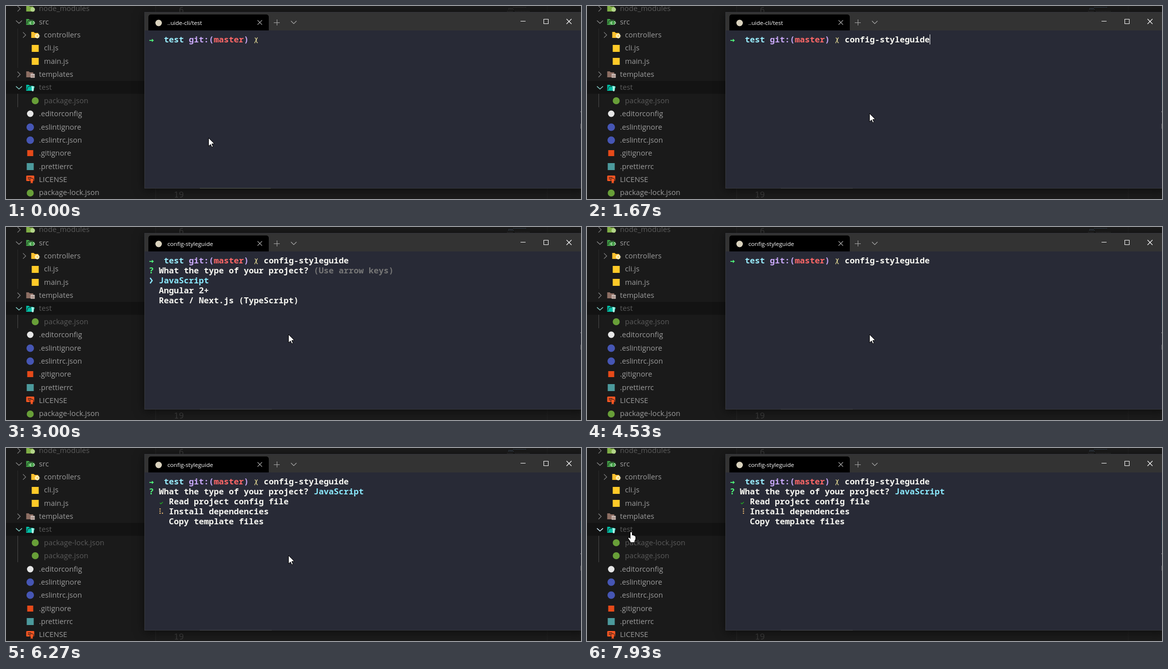
Animation of 1151x387 px, one loop 8 s. Source, as an HTML page with a canvas:

```html
<!DOCTYPE html>
<html lang="en">
<head>
<meta charset="utf-8">
<title>Terminal session</title>
<style>
html, body { margin: 0; width: 100%; height: 100%; overflow: hidden; background: #1a1a1a; }
canvas { display: block; }
</style>
</head>
<body>
<canvas id="stage" width="1151" height="387"></canvas>
<script>
const ctx = document.getElementById('stage').getContext('2d');
const LOOP = 8000, STEP = 1000 / 15;
const MONO_FACE = '16.667px "Noto Sans Mono", "DejaVu Sans Mono", monospace';
const MONO = '600 ' + MONO_FACE;
const SANS = '"Open Sans", "Noto Sans", sans-serif';
const C = {
  white: '#f8f8f2', cyan: '#8be9fd', mint: '#9aedfe', purple: '#caa9fa',
  red: '#ff6767', green: '#50fa7b', yellow: '#ece29a', amber: '#f0bd72',
  hint: '#767676', label: '#9c9c9c', faded: '#5a5a5a'
};

// ---- drawing helpers ----
function rect(x, y, w, h, color) {
  ctx.fillStyle = color;
  ctx.fillRect(x, y, w, h);
}

function disc(x, y, r, color) {
  ctx.fillStyle = color;
  ctx.beginPath();
  ctx.arc(x, y, r, 0, Math.PI * 2);
  ctx.fill();
}

function rounded(x, y, w, h, r, color) {
  ctx.fillStyle = color;
  ctx.beginPath();
  ctx.roundRect(x, y, w, h, r);
  ctx.fill();
}

function line(points, color, width = 1) {
  ctx.strokeStyle = color;
  ctx.lineWidth = width;
  ctx.beginPath();
  points.forEach(([x, y]) => ctx.lineTo(x, y));
  ctx.stroke();
}

function poly(points, x, y, fill, edge) {
  ctx.beginPath();
  points.forEach(([px, py]) => ctx.lineTo(x + px, y + py));
  ctx.closePath();
  ctx.fillStyle = fill;
  ctx.fill();
  if (edge) {
    ctx.strokeStyle = edge;
    ctx.lineWidth = 1;
    ctx.stroke();
  }
}

function text(str, x, y, font, color) {
  ctx.font = font;
  ctx.fillStyle = color;
  ctx.fillText(str, x, y);
}

// ---- file tree ----
function folder(x, y, color, open) {
  poly([[-8, -6], [-3, -6], [-1, -4], [6, -4], [6, 6], [-8, 6]], x, y, color);
  if (open) {
    poly([[-5, -2], [9, -2], [6, 6], [-8, 6]], x, y, color);
    line([[x - 6.5, y + 4], [x - 4.5, y - 2.5], [x + 6, y - 2.5]], '#1a1a1a');
  }
}

const icons = {
  modules(x, y) {
    folder(x, y, '#7fae45');
    disc(x + 5, y + 2, 4.5, '#b4d58a');
  },
  src(x, y) {
    folder(x, y, '#43a047', true);
    line([[x + 2, y - 1], [x - 1, y + 2], [x + 2, y + 5]], '#c8e6c9', 1.3);
    line([[x + 6, y - 1], [x + 9, y + 2], [x + 6, y + 5]], '#c8e6c9', 1.3);
  },
  controllers(x, y) {
    folder(x, y, '#fbc02d');
    for (let i = 0; i < 4; i++) {
      const a = i * Math.PI / 4, dx = Math.cos(a) * 5, dy = Math.sin(a) * 5;
      line([[x + 4 - dx, y + 2 - dy], [x + 4 + dx, y + 2 + dy]], '#fff3c4', 2);
    }
    disc(x + 4, y + 2, 3.8, '#fff3c4');
    disc(x + 4, y + 2, 1.5, '#fbc02d');
  },
  templates(x, y) {
    folder(x, y, '#8d6e63');
    rect(x + 1, y - 1, 8, 8, '#d7ccc8');
    for (const dy of [1, 3, 5]) rect(x + 2, y + dy, 6, 1, '#8d6e63');
  },
  test(x, y) {
    folder(x, y, '#00bfa5', true);
    rect(x + 2, y - 3, 6, 1.5, '#b2f2e8');
    rounded(x + 3, y - 2, 4, 9, [0, 0, 2, 2], '#b2f2e8');
  },
  js(x, y) { rect(x - 7, y - 7, 14, 14, '#ffca28'); },
  node(x, y) { disc(x, y, 7, '#689f38'); },
  editor(x, y) { disc(x, y, 6.5, '#e6e6e6'); },
  lint(x, y) { disc(x, y, 7.5, '#4656b4'); },
  git(x, y) { rect(x - 6, y - 6, 12, 12, '#e64a19'); },
  format(x, y) { rect(x - 7, y - 7, 14, 14, '#4c9a9c'); },
  license(x, y) {
    rounded(x - 8, y - 8, 16, 11, 1.5, '#ff5722');
    rect(x - 5, y - 5, 7, 1.3, '#1a1a1a');
    rect(x - 5, y - 2, 4, 1.3, '#1a1a1a');
    disc(x + 3, y + 1, 4.3, '#1a1a1a');
    poly([[1, 3], [5, 3], [5, 8], [3, 6.5], [1, 8]], x, y, '#ff5722');
    disc(x + 3, y + 1, 3.2, '#ff5722');
  }
};

// name, icon, depth, chevron, faded
const before = [
  ['node_modules', 'modules', 0, '>', 1],
  ['src', 'src', 0, 'v'],
  ['controllers', 'controllers', 1, '>'],
  ['cli.js', 'js', 1],
  ['main.js', 'js', 1],
  ['templates', 'templates', 0, '>'],
  ['test', 'test', 0, 'v', 1],
  ['package.json', 'node', 1, '', 1],
  ['.editorconfig', 'editor', 0],
  ['.eslintignore', 'lint', 0],
  ['.eslintrc.json', 'lint', 0],
  ['.gitignore', 'git', 0],
  ['.prettierrc', 'format', 0],
  ['LICENSE', 'license', 0],
  ['package-lock.json', 'node', 0]
];
const after = [...before];
after.splice(7, 0, ['package-lock.json', 'node', 1, '', 1]);
const rowY = i => 5.4 + 26.37 * i;

function drawTree(t) {
  const rows = t >= 5860 ? after : before;
  rect(0, 150, 299, 26, '#131313');
  rect(23, 45, 1, 79, '#2b2b2b');
  rect(23, 176, 1, rows === after ? 53 : 27, '#4b4b4b');
  rows.forEach(([name, icon, depth, chevron, faded], i) => {
    const y = rowY(i), x = depth * 10;
    const hot = name === 'test';
    const tint = hot ? (t >= 7320 ? '#d5f1ff' : '#80cbc4') : '#858585';
    const cx = 26 + x * 1.1;
    if (chevron === '>') line([[cx - 3, y - 5.5], [cx + 2.5, y], [cx - 3, y + 5.5]], tint, 1.2);
    if (chevron === 'v') line([[cx - 6, y - 2.5], [cx, y + 3], [cx + 6, y - 2.5]], tint, 1.4);
    icons[icon](48.5 + x, Math.round(y));
    text(name, 66 + x, Math.round(y + 4.8), '14.7px ' + SANS, faded ? C.faded : C.label);
  });
}

// ---- editor behind the window ----
function drawEditor(t) {
  rect(299, 0, 852, 387, '#1b1b1b');
  rect(299, 0, 1, 387, '#252525');
  rect(1083, 0, 1, 387, '#212121');
  text('6', 346, 14, MONO_FACE, '#3c3c3c');
  text('19', 336, 384, MONO_FACE, '#3c3c3c');
  const focused = t >= 660;
  [[0, 12, 26], [1, 3, 9], [2, 2, 10], [4, 0, 12], [4, 16, 30], [5, 2, 40]].forEach(([row, x, w], i) => {
    for (let k = 0; k < w; k += 3) {
      rect(1003 + x + k, 2 + row * 2, 2, 1, focused && i < 3 ? '#3d4c5c' : '#383838');
    }
  });
}

// ---- terminal window ----
function drawWindow(t) {
  ctx.save();
  ctx.shadowColor = 'rgba(0,0,0,.55)';
  ctx.shadowBlur = 18;
  ctx.shadowOffsetY = 3;
  rect(277, 12, 880, 354, '#36373c');
  ctx.restore();
  rect(278, 13, 873, 36, '#333333');
  rect(278, 49, 873, 316, '#282a36');
  rect(388, 365, t < 660 ? 142 : 144, 1, t < 660 ? '#575a50' : '#484a4e');
  rect(1150, 146, 1, 25, '#1e3c46');
  rect(1150, 211, 1, 2, '#8a8a8a');
  rect(1150, 236, 1, 10, '#6a6a6a');

  rounded(285, 17, 241, 32, [5, 5, 0, 0], '#000');
  disc(305.5, 34, 6.5, '#d9d2bd');
  text(t < 2520 ? '..uide-cli/test' : 'config-styleguide', 323, 38, '11.6px ' + SANS, '#fff');

  const grey = '#a8a8a8';
  line([[503.5, 28.5], [512.5, 37.5]], grey, 1.1);
  line([[512.5, 28.5], [503.5, 37.5]], grey, 1.1);
  line([[536, 33.5], [548, 33.5]], grey);
  line([[542.5, 27], [542.5, 39]], grey);
  line([[570.5, 30], [576, 35.5], [581.5, 30]], grey, 1.1);
  rect(1030, 30, 10, 1, '#fff');
  ctx.strokeStyle = '#fff';
  ctx.lineWidth = 1;
  ctx.strokeRect(1076.5, 26.5, 9, 9);
  line([[1122, 26], [1132, 36]], '#fff', 1.1);
  line([[1132, 26], [1122, 36]], '#fff', 1.1);
}

const colX = c => 286 + 10 * c;
const lineY = r => 57 + 20 * r;
const put = (col, row, str, color = C.white) => text(str, colX(col), lineY(row) + 16, MONO, color);
const caret = (col, row) => rect(colX(col), lineY(row), 1, 20, '#fff');

// Braille dots 1-6, numbered down each column, one string per spinner step.
const DOTS = '124 145 1456 456 3456 356 236 1236 123 1234'.split(' ');

function spinner(row, t) {
  const step = Math.floor((t - 4524.5) / 101) % DOTS.length;
  for (const d of DOTS[step]) {
    const k = d - 1;
    disc(colX(2) + (k < 3 ? 2.4 : 7.2), lineY(row) + 5.3 + (k % 3) * 4.2, 1.25, C.amber);
  }
}

function tick(row) {
  const x = colX(2), y = lineY(row);
  line([[x + 2, y + 13], [x + 4, y + 15], [x + 8, y + 11.5]], '#20b020', 1.3);
}

function drawPrompt() {
  line([[287, 69], [294, 69]], C.green, 1.8);
  poly([[0, -3.2], [4, 0], [0, 3.2]], 292, 69, C.green);
  put(3, 0, 'test', C.mint);
  put(8, 0, 'git:(', C.purple);
  put(13, 0, 'master', C.red);
  put(19, 0, ')', C.purple);
  line([[503.5, 63], [497.5, 74.5]], C.yellow, 1.2);
  line([[498, 63.5], [500, 65], [502, 73], [504, 74]], C.yellow, 1.2);
}

function drawSession(t) {
  drawPrompt();
  if (t >= 1660) put(23, 0, 'config-styleguide');
  else if (t >= 1460) {
    put(23, 0, 'c');
    put(24, 0, 'lear', C.hint);
  }

  if (t >= 660 && t < 1195) caret(23, 0);
  else if (t >= 1460 && t < 1660) caret(24, 0);
  else if (t >= 1660 && t < 2260) caret(40, 0);
  else if (t >= 2520 && t < 2995) caret(0, 1);

  const asking = t >= 2995 && t < 4530, answered = t >= 4595;
  if (asking || answered) {
    put(0, 1, '?', C.green);
    put(2, 1, 'What the type of your project?');
  }
  if (asking) {
    put(33, 1, '(Use arrow keys)', C.hint);
    line([[288.5, 102], [292.5, 107.5], [288.5, 113]], C.cyan, 2.4);
    put(2, 2, 'JavaScript', C.cyan);
    put(2, 3, 'Angular 2+');
    put(2, 4, 'React / Next.js (TypeScript)');
  }
  if (answered) put(33, 1, 'JavaScript', C.cyan);
  if (t >= 4660) {
    ['Read project config file', 'Install dependencies', 'Copy template files']
      .forEach((task, i) => put(4, 2 + i, task));
    if (t >= 4730) tick(2);
    spinner(t >= 4730 ? 3 : 2, t);
  }
}

// ---- pointer ----
const path = [
  [0, 405, 264], [333, 565, 215], [7000, 565, 215], [7133, 250, 232],
  [7200, 71, 240], [7333, 86, 171], [7800, 86, 171], [7933, 88, 168]
];

function pointerAt(t) {
  const i = path.findIndex(p => p[0] > t);
  if (i < 0) return path[path.length - 1].slice(1);
  const [t0, x0, y0] = path[i - 1], [t1, x1, y1] = path[i];
  const u = (t - t0) / (t1 - t0), e = u * u * (3 - 2 * u);
  return [Math.round(x0 + (x1 - x0) * e), Math.round(y0 + (y1 - y0) * e)];
}

const ARROW = [[0, 0], [0, 16.5], [4, 13], [6.5, 18.5], [9, 17.5], [6.5, 12], [11.5, 11.5]];
const HAND = [
  [-2, 1], [-1, 0], [1, 0], [2, 1], [2, 6], [5, 6.5], [8, 8], [9, 10], [9, 14],
  [7, 18], [7, 21], [-2, 21], [-2, 19], [-6, 13], [-6, 11], [-4, 11], [-2, 13]
];

function drawPointer(t) {
  const [x, y] = pointerAt(t);
  poly(x < 277 ? HAND : ARROW, x + 0.5, y + 0.5, '#fff', '#000');
}

// The picture advances at 15 steps a second; a small lead keeps changes on time.
const LEAD = 5;

function draw(ms) {
  const t = Math.floor((ms % LOOP + LEAD) / STEP) * STEP % LOOP;
  rect(0, 0, 1151, 387, '#1a1a1a');
  drawTree(t);
  drawEditor(t);
  drawWindow(t);
  drawSession(t);
  drawPointer(t);
}

let start;
function tickFrame(now) {
  start ??= now;
  draw(now - start);
  requestAnimationFrame(tickFrame);
}
requestAnimationFrame(tickFrame);
</script>
</body>
</html>
```
